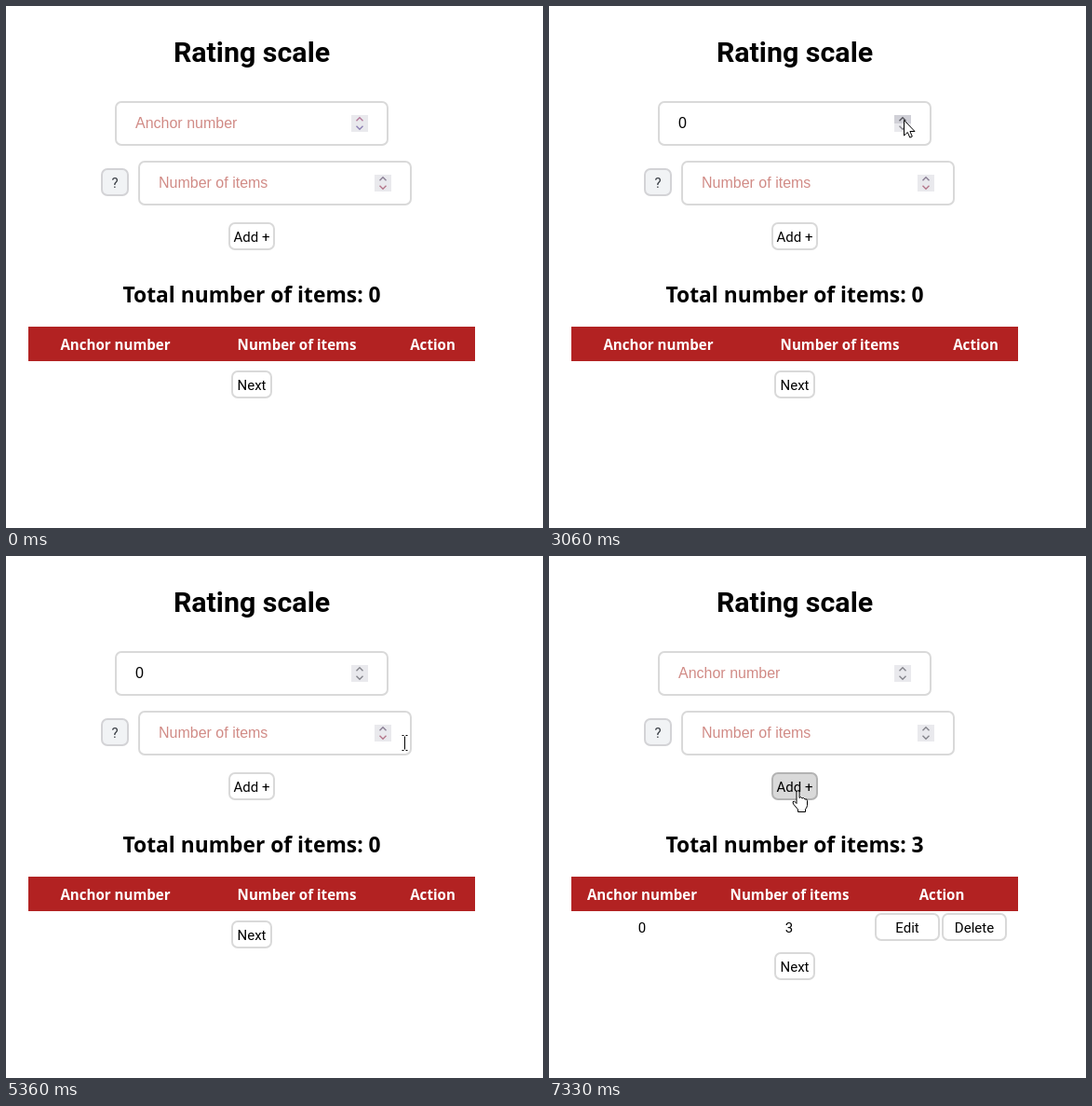
An HTML page with a canvas for the animation above (8 s loop, 577 px wide and 560 px high).

```html
<!DOCTYPE html>
<html lang="en">
<head>
<meta charset="utf-8">
<title>Rating scale</title>
<style>
  html, body { margin: 0; width: 100%; height: 100%; overflow: hidden; background: #fff; }
  canvas { display: block; }
</style>
</head>
<body>
<canvas id="stage" width="577" height="560"></canvas>
<script>
const ctx = document.getElementById('stage').getContext('2d');

// All times below are counted in ticks.
const LOOP = 8000, TICK = 66;
const PRESS = 109, SUBMIT = 110;

const UI = '15px Roboto, sans-serif';
const FIELD = '16px "Liberation Sans", Arial, sans-serif';
const HEAD = 'bold 15.1px "Open Sans", sans-serif';

const fields = [
  {
    x: 117, y: 102, hint: 'Anchor number', tints: ['#b3789a', '#8d80b4'],
    bursts: [
      { from: 18, every: 8, count: 2, step: -1 },
      { from: 41, every: 3.5, count: 5, step: 1 },
      { from: 63, every: 6, count: 3, step: -1 }
    ]
  },
  {
    x: 142, y: 166, hint: 'Number of items', tints: ['#8b7f95', '#b5788c'],
    bursts: [{ from: 87, every: 3.5, count: 3, step: 1 }]
  }
];

const entrance = { x: 513, y: 540 };
const moves = [
  { from: 5, to: 13, x: 384, y: 128 },
  { from: 27, to: 32, x: 380, y: 113 },
  { from: 33, to: 35, x: 381, y: 126 },
  { from: 37, to: 39, x: 381, y: 122 },
  { from: 56, to: 59, x: 381, y: 132 },
  { from: 76, to: 80, x: 428, y: 200 },
  { from: 81, to: 86, x: 407, y: 187 },
  { from: 95, to: 106, x: 267, y: 251 }
];

const clamp = u => Math.min(1, Math.max(0, u));
const easeOut = u => u * (2 - u);
const smooth = u => u * u * (3 - 2 * u);
const inside = (p, x, y, w, h) => p && p.x >= x && p.x < x + w && p.y >= y && p.y < y + h;

function pointerAt(tick) {
  if (tick < moves[0].from) return null;
  let { x, y } = entrance;
  for (const m of moves) {
    const u = clamp((tick - m.from) / (m.to - m.from));
    x += (m.x - x) * easeOut(u);
    y += (m.y - y) * smooth(u);
  }
  return { x: Math.round(x), y: Math.round(y) };
}

const pressTick = (burst, i) => Math.floor(burst.from + i * burst.every);

function pressesOf(burst, tick) {
  let n = 0;
  while (n < burst.count && pressTick(burst, n) <= tick) n++;
  return n;
}

function isPressing(tick) {
  return tick === PRESS || fields.some(f => f.bursts.some(b =>
    pressesOf(b, tick) > pressesOf(b, tick - 1)));
}

function text(str, x, y, font, color = '#000', align = 'center') {
  ctx.font = font;
  ctx.fillStyle = color;
  ctx.textAlign = align;
  ctx.fillText(str, x, y);
}

function box(x, y, w, h, fill = '#fff', border = '#d9d9d9') {
  ctx.beginPath();
  ctx.roundRect(x + 1, y + 1, w - 2, h - 2, 6);
  ctx.fillStyle = fill;
  ctx.fill();
  ctx.strokeStyle = border;
  ctx.lineWidth = 2;
  ctx.stroke();
}

function button(label, x, y, w, fill, border) {
  box(x, y, w, 30, fill, border);
  text(label, x + w / 2, y + 21, UI);
}

function chevron(x, y, dir, color) {
  ctx.beginPath();
  ctx.moveTo(x - 3.5, y + 1.7 * dir);
  ctx.lineTo(x, y - 1.7 * dir);
  ctx.lineTo(x + 3.5, y + 1.7 * dir);
  ctx.strokeStyle = color;
  ctx.lineWidth = 1.4;
  ctx.stroke();
}

function drawField({ x, y, hint, tints, bursts }, tick, pointer) {
  const used = tick >= bursts[0].from;
  const filled = used && tick < SUBMIT;
  const value = bursts.reduce((sum, b) => sum + b.step * pressesOf(b, tick), 0);
  box(x, y, 294, 48);
  text(filled ? value : hint, x + 22, y + 29, FIELD, filled ? '#000' : '#d18b86', 'left');

  const sx = x + 254, sy = y + 15;
  for (let half = 0; half < 2; half++) {
    const top = sy + half * 9;
    const hover = inside(pointer, sx, top, 18, 9);
    ctx.fillStyle = hover ? '#d0d0d7' : '#e9e9ed';
    ctx.fillRect(sx, top, 18, 9);
    const color = hover ? '#55555c' : used ? '#85858c' : tints[half];
    chevron(sx + 9, top + 4.5, half ? -1 : 1, color);
  }
}

function drawTable(added) {
  ctx.fillStyle = '#b22222';
  ctx.fillRect(24, 344, 480, 37);
  const centers = added ? [100, 258.5, 422] : [117.5, 312.5, 458.5];
  ['Anchor number', 'Number of items', 'Action'].forEach((label, i) =>
    text(label, centers[i], 369, HEAD, '#fff'));
  if (added) {
    text('0', 100, 404, UI);
    text('3', 258, 404, UI);
    button('Edit', 350, 383, 70);
    button('Delete', 422, 383, 70);
  }
  button('Next', 242, added ? 425 : 391, 44);
}

function outline(d) {
  const shape = new Path2D(d);
  ctx.fillStyle = '#fff';
  ctx.fill(shape);
  ctx.strokeStyle = '#000';
  ctx.lineWidth = 1;
  ctx.lineJoin = 'round';
  ctx.stroke(shape);
}

function drawPointer(p, overAdd) {
  const overSpin = fields.some(f => inside(p, f.x + 254, f.y + 15, 18, 18));
  const overField = fields.some(f => inside(p, f.x, f.y, 294, 48));
  ctx.save();
  ctx.translate(p.x + 0.5, p.y + 0.5);
  if (overAdd) {
    outline('M-1.5 1.5Q0-1 1.5 1.5V8Q3 6 4.5 8.5Q6 7 7.5 9.5Q9.5 8.5 10 11V16Q9.5 19 8 20V23H0V20.5' +
            'L-5 14.5Q-6.5 11.5-4 11.5L-1.5 14Z');
  } else if (overField && !overSpin) {
    ctx.strokeStyle = '#000';
    ctx.lineWidth = 1;
    ctx.stroke(new Path2D('M-3-8H-1M1-8H3M0-7V7M-3 8H-1M1 8H3'));
  } else {
    outline('M0 0V16.5L3.8 13L6.3 18.6L8.8 17.5L6.4 12H11.5Z');
  }
  ctx.restore();
}

function drawHalo(p) {
  ctx.fillStyle = 'rgba(255, 255, 0, 0.55)';
  ctx.beginPath();
  ctx.arc(p.x, p.y - 0.5, 11.5, 0, Math.PI * 2);
  ctx.fill();
}

function render(tick) {
  const pointer = pointerAt(tick);
  const added = tick >= SUBMIT;
  const overAdd = inside(pointer, 239, 232, 50, 30);

  ctx.fillStyle = '#fff';
  ctx.fillRect(0, 0, 577, 560);
  text('Rating scale', 264, 60, 'bold 30.4px Roboto, sans-serif');
  fields.forEach(f => drawField(f, tick, pointer));
  box(102, 174, 30, 30, '#f1f3f5', '#d3d3d6');
  text('?', 117, 195, UI, '#33383f');
  button('Add +', 239, 232, 50, overAdd ? '#d9d9d9' : '#fff', overAdd ? '#b3b3b3' : '#d9d9d9');
  text('Total number of items: ' + (added ? 3 : 0), 264, 318, 'bold 22.8px "Open Sans", sans-serif');
  drawTable(added);

  if (!pointer) return;
  if (isPressing(tick)) drawHalo(pointer);
  drawPointer(pointer, overAdd);
}

const start = performance.now();
function frame() {
  render(Math.floor((performance.now() - start) % LOOP / TICK));
  requestAnimationFrame(frame);
}
frame();
</script>
</body>
</html>
```
